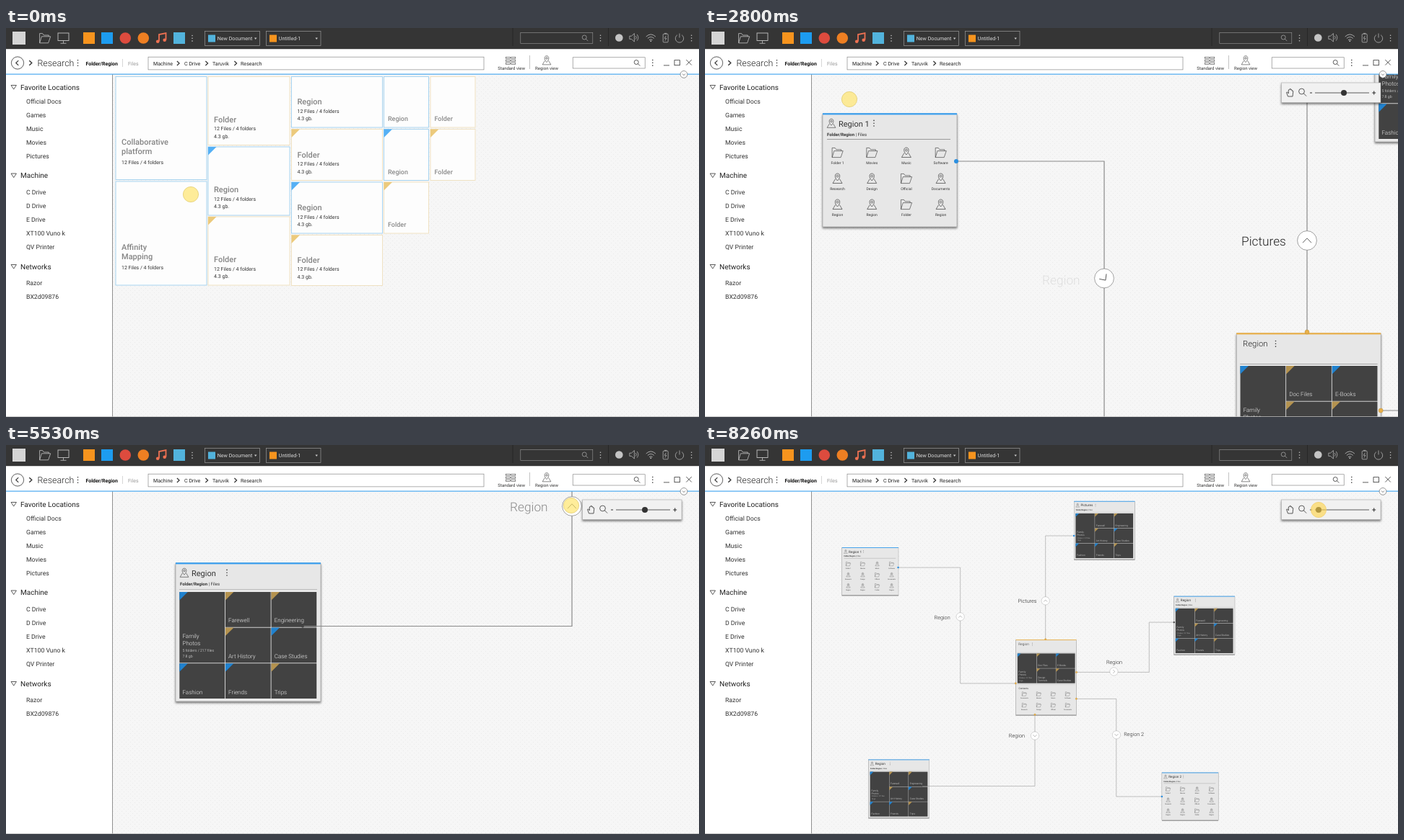
These frames come from a looping animation (960x540 px, 8.4 s). An HTML page:

```html
<!DOCTYPE html>
<html lang="en">
<head>
<meta charset="utf-8">
<title>Region file browser</title>
<style>
html, body { margin: 0; width: 100%; height: 100%; overflow: hidden; background: #fff; }
svg { display: block; width: 960px; height: 540px; font-family: Roboto, sans-serif; text-rendering: geometricPrecision; }
.shadow { filter: drop-shadow(0 2px 1.5px rgba(0, 0, 0, .5)); }
</style>
</head>
<body>
<svg id="stage" viewBox="0 0 960 540"></svg>
<script>
const BLUE = '#3a9fee', TAN = '#e9b04a', INK = '#333', PALE = '#c4c4c4';
const LOOP = 8400, STEP = 70;

// Drawing helpers
const text = (x, y, s, size, fill = INK, weight = 400, anchor = 'start') =>
  `<text x="${x}" y="${y}" font-size="${size}" fill="${fill}" font-weight="${weight}" text-anchor="${anchor}">${s}</text>`;
const rect = (x, y, w, h, fill = 'none', stroke = 'none', width = .7, more = '') =>
  `<rect x="${x}" y="${y}" width="${w}" height="${h}" fill="${fill}" stroke="${stroke}" stroke-width="${width}" ${more}/>`;
const circle = (x, y, r, fill = 'none', stroke = 'none', width = .8) =>
  `<circle cx="${x}" cy="${y}" r="${r}" fill="${fill}" stroke="${stroke}" stroke-width="${width}"/>`;
const path = (d, stroke = INK, width = .8, fill = 'none') =>
  `<path d="${d}" fill="${fill}" stroke="${stroke}" stroke-width="${width}"/>`;
const group = (x, y, body, scale = 1) =>
  `<g transform="translate(${x} ${y}) scale(${scale})">${body}</g>`;
const dots = (x, y, fill = INK, gap = 3.8) => [-gap, 0, gap].map(d => circle(x, y + d, .8, fill)).join('');
const corner = (x, y, size, fill) => path(`M${x} ${y}h${size}l${-size} ${size}z`, 'none', 0, fill);
const lens = (x, y, r, stroke, width = .8) =>
  circle(x, y, r, 'none', stroke, width) + path(`M${x + r * .7} ${y + r * .7}l${r} ${r}`, stroke, width);
const chevron = (x, y, angle = 0, size = 1, width = 1.1) =>
  `<g transform="translate(${x} ${y}) rotate(${angle}) scale(${size})">${path('M-3 1.6L0-1.6L3 1.6', INK, width / size)}</g>`;
const folder = (x, y, stroke = INK, width = .6) => group(x, y,
  path('M-7.4 6.6V-6.6h4l1.8 2.4H5.2V-2.4M-7.4 6.6L-4.6-2.4H7.7L4.6 6.6z', stroke, width));
const pin = (x, y, size = 1) => group(x, y,
  path('M0 3C-4.5-1.5-4-7 0-7S4.5-1.5 0 3z', INK, .65) + circle(0, -3.4, 1.4, 'none', INK, .65) +
  path('M-3 .6L-6.5 6.5H6.5L3 .6', INK, .65), size);

// Tiles of the standard view
function tile([x, y, w, h, kind, marked, title]) {
  const blue = kind === 'Region', bottom = y + h, lines = (title || kind).split('|');
  let out = rect(x, y, w, h, '#fdfdfd', blue ? '#9fd0ef' : '#efdfbd', .9);
  if (marked) out += corner(x, y, 11.5, blue ? '#55b0f5' : '#ecca7c');
  if (w < 100) return out + text(x + 5.5, bottom - 9, kind, 9, '#8a8a8a', 500);
  if (title) out += text(x + 8, bottom - 49, lines[0], 11, '#858585', 500) + text(x + 8, bottom - 36, lines[1], 11, '#858585', 500);
  else out += text(x + 8, bottom - 32, kind, 11, '#858585', 500) + text(x + 8, bottom - 10, '4.3 gb.', 7);
  return out + text(x + 8, bottom - (title ? 22 : 20.5), '12 Files / 4 folders', 7);
}
const tiles = [
  [152, 67.5, 126, 143, 'Region', 0, 'Collaborative|platform'],
  [152, 213, 126, 144, 'Region', 0, 'Affinity|Mapping'],
  [280, 67.5, 113, 95, 'Folder', 0], [280, 165, 113, 95, 'Region', 1], [280, 262, 113, 95, 'Folder', 1],
  [395.5, 67.5, 126, 70.5, 'Region', 0], [395.5, 140.5, 126, 71, 'Folder', 1],
  [395.5, 214, 126, 71, 'Region', 1], [395.5, 287.5, 126, 70, 'Folder', 1],
  [523.5, 67.5, 62, 70.5, 'Region', 0], [588, 67.5, 62, 70.5, 'Folder', 0],
  [523.5, 140.5, 62, 71, 'Region', 1], [588, 140.5, 62, 71, 'Folder', 1], [523.5, 214, 62, 71, 'Folder', 1]
].map(tile).join('');

// Panels of the region map
const frame = (w, h, color) =>
  rect(0, 0, w, h, '#e7e7e7', '#999', .6, 'class="shadow"') + rect(0, -.8, w, 2.2, color);
const heading = title => pin(12, 13.5, .9) + text(22, 17.5, title, 11) +
  dots(71, 13.2) + text(6, 30.5, '<tspan font-weight="700">Folder/Region</tspan> | Files', 6);
const icon = (x, y, name, isPin) => (isPin ? pin : folder)(x, y) + text(x, y + 15.7, name, 5, INK, 400, 'middle');

// Dark tiles: column, row, blue or tan corner, title
const darkGrid = (top, list) => list.map(([col, row, blue, name]) => {
  const x = 5.3 + col * 63.6, y = top + row * 49.6, tall = name === 'Family|Photos', h = tall ? 98.4 : 48.8;
  const write = (dy, s, size = 8) => text(x + 4.2, y + h - dy, s, size, '#eee', 300);
  const [a, b] = name.split('|');
  return rect(x, y, 62.8, h, '#424242') + corner(x, y, 11.5, blue ? '#2082cf' : '#b5934f') +
    (tall ? write(34.2, a) + write(24.8, b) + write(15.4, '5 folders / 217 files', 5.2) + write(7.4, '7.8 gb', 5.2)
          : b ? write(15.8, a) + write(6.2, b) : write(6.5, a));
}).join('');

const photoPanel = (x, y, title) => group(x, y, frame(201, 192, BLUE) + heading(title) +
  path('M5 36.5H196', '#aaa', .7) + rect(4.8, 39.5, 191.5, 149, '#f4f4f4') + darkGrid(40, [
    [0, 0, 1, 'Family|Photos'], [1, 0, 0, 'Farewell'], [2, 0, 0, 'Engineering'], [1, 1, 0, 'Art History'],
    [2, 1, 1, 'Case Studies'], [0, 2, 1, 'Fashion'], [1, 2, 1, 'Friends'], [2, 2, 0, 'Trips']]));

const iconPanel = (x, y, title) => group(x, y, frame(186, 157, BLUE) + heading(title) +
  path('M6 35.5H177', '#888', .8) +
  ['Folder 1', 'Movies', '*Music', 'Software', '*Research', '*Design', 'Official', '*Documents',
   '*Region', '*Region', 'Folder', '*Region'].map((s, i) =>
    icon(20.5 + i % 4 * 47.7, 54 + (i >> 2) * 36, s.replace('*', ''), s[0] === '*')).join(''));

const homePanel = group(376.2, 164, frame(200, 248, TAN) + text(8.9, 18.4, 'Region', 11.3, '#222', 300) + dots(54.3, 14.3) +
  path('M5 42.5H195.5M5 146.6H195.5', '#777', .6) + rect(4.8, 44.5, 191, 99.8, '#f4f4f4') + darkGrid(45, [
    [0, 0, 1, 'Family|Photos'], [1, 0, 0, 'Doc Files'], [2, 0, 1, 'E-Books'],
    [1, 1, 0, 'Design|Turorials'], [2, 1, 0, 'Case Studies']]) +
  text(9.3, 162.8, 'Contents', 8) +
  ['Documents', 'Movies', 'Music', 'Software', 'Research', 'Design', 'Official', 'Documents'].map((s, i) =>
    icon(28 + i % 4 * 47.7, 178.7 + (i >> 2) * 37, s)).join(''));

const wires = ['M-12-75H193V308H376', 'M568-180H474V162', 'M576 271H816V106H898',
  'M576 359H707.5V682H858', 'M439 411V647.5H66'].map(d => path(d, '#8a8a8a', 1.2)).join('');
const nodes = [[375.7, 307.8], [474, 162], [576.2, 271], [575.7, 358.7], [439, 411]]
    .map(([x, y]) => circle(x, y, 3, TAN, '#a9802f', .4)).join('') +
  [[-12, -75], [568, -180], [858, 682]].map(([x, y]) => circle(x, y, 3, '#2b8fe0')).join('') +
  circle(898, 106, 2.8, '#444') + circle(66, 648, 1.8, '#444');
const stop = (x, y, angle, label, lx, ly, id = '') => circle(x, y, 13.4, '#fff', '#666', .6) +
  `<g ${id && `id="turn${id}"`}>${chevron(x, y, angle, 2, .75)}</g>` +
  `<g ${id && `id="label${id}"`}>${text(lx, ly, label, 17.3, '#222', 300)}</g>`;
const map = photoPanel(568, -294, 'Pictures') + photoPanel(897.5, 20, 'Region') + photoPanel(-110, 560, 'Region') +
  iconPanel(-197, -141, 'Region 1') + iconPanel(858, 603, 'Region 2') + homePanel + wires + nodes +
  stop(193, 87.5, 0, 'Region', 107, 96, 1) + stop(474, 35, 0, 'Pictures', 383, 42) +
  stop(699.6, 268.8, 90, 'Region', 674.5, 243.2) + stop(708, 478, 180, 'Region 2', 732.5, 482) +
  stop(439, 481, 180, 'Region', 353, 487.5, 2);

const zoomBar = rect(798.5, 76, 137.5, 27.5, '#f1f1f1', '#aaa', .6, 'class="shadow"') +
  path('M807.5 95L805.5 89.5l1.2-.6 1.6 2V86q.9-1 1.6 0v-1.2q.9-1 1.7 0V86q.9-.8 1.6 0v1.4q1.2-.8 1.6.3L814 95z') +
  lens(826.5, 88, 3.9, INK) + path('M838 90h3M924.2 90h5M926.7 87.5v5', INK, 1.1) + path('M845 90H920') +
  `<circle id="knob" cy="90" r="4" fill="${INK}"/>`;

// Window chrome
const section = (y, title, step, names) => path(`M7 ${y - 6}h7.4l-3.7 5.6z`) + text(20, y, title, 10, '#222') +
  names.map((s, i) => text(28, y + step + i * 19.1, s, 8.7)).join('');
const sidebar = rect(0, 64, 147.5, 476, '#fff') + path('M147.5 64V540', '#777') + path('M0 539.5H960', '#bbb') +
  section(85.5, 'Favorite Locations', 19.2, ['Official Docs', 'Games', 'Music', 'Movies', 'Pictures']) +
  section(208, 'Machine', 23, ['C Drive', 'D Drive', 'E Drive', 'XT100 Vuno k', 'QV Printer']) +
  section(334.5, 'Networks', 22.5, ['Razor', 'BX2d09876']);

const toolbar = rect(0, 28, 960, 36, '#fff') + path('M0 64.1H960', '#52adf0', 1.3) +
  circle(16, 48.5, 8.6, 'none', INK) + chevron(15.5, 48.5, -90, 1.1) + chevron(34, 48.5, 90, 1.1, 1.4) +
  text(43.5, 53, 'Research', 12.4, '#222', 300) + dots(99.5, 48.5) + text(110.5, 51.5, 'Folder/Region', 7, '#111', 700) +
  path('M161.5 43V54', '#ccc') + text(169, 51.5, 'Files', 7, '#999') + rect(197, 40.2, 465, 17.7, '#fff', '#777', .6) +
  [[204, 'Machine'], [247, 'C Drive'], [286, 'Taruvik'], [325, 'Research']].map(([x, s]) => text(x, 51.7, s, 7.1, '#222')).join('') +
  [238.5, 278, 318].map(x => chevron(x, 49, 90, 1, 1.2)).join('') +
  [40.3, 44.2, 48.1].map(y => rect(692.4, y, 6, 2.4, 'none', INK, .55) + rect(699.8, y, 6, 2.4, 'none', INK, .55)).join('') +
  text(700.2, 57.8, 'Standard view', 6, INK, 400, 'middle') + path('M725.5 38V57', '#999', .6) +
  pin(749, 45, .9) + text(749, 57.8, 'Region view', 6, INK, 400, 'middle') +
  rect(785.2, 40.8, 100, 15.2, '#fff', '#777', .6) + lens(873.2, 47.5, 3, INK) + dots(895.8, 48.3) +
  path('M911 51.9H919M942.3 44l7.5 7.5M949.8 44l-7.5 7.5') + rect(926, 44.7, 7.6, 7, 'none', INK, .8) +
  circle(939, 64.4, 4.9, '#fff', '#555', .6) + chevron(939, 64.6, 180, .65, .6);

const menuButton = (x, w, color, label) => rect(x, 4.5, w, 20, 'none', '#999') +
  rect(x + 4.5, 9.5, 10, 10, color) + text(x + 17.3, 17.2, label, 7.1, '#ddd') +
  path(`M${x + w - 7.5} 13.5h3.4l-1.7 2.6z`, 'none', 0, '#ccc');
const topBar = rect(0, 0, 960, 29.2, '#353535') + path('M702 0V25M834.5 0V25', '#222', .7) +
  rect(9, 5, 18, 18, '#d5d5d5') + folder(54, 14.2, PALE, .8) +
  rect(72, 7, 15, 10.5, 'none', PALE, .9) + path('M79.5 17.5v3.5M75.5 21.3h8', PALE) +
  rect(107, 6, 16, 16, '#f7941e') + rect(132, 6, 16, 16, '#1d9cf0') +
  circle(165.3, 14, 7.8, '#dd4b3e') + circle(190.3, 14, 7.8, '#ee7f22') +
  path('M212 18.5V9l9.5-2v9.5', '#ee7152', 1.8) + circle(210.2, 18.8, 2.3, '#ee7152') + circle(219.7, 16.8, 2.3, '#ee7152') +
  rect(232, 6, 16, 16, '#52b3dc') + dots(258, 14.3, PALE) +
  menuButton(275.5, 76, '#52b3dc', 'New Document') + menuButton(360.5, 75.5, '#f7941e', 'Untitled-1') +
  rect(712.8, 6.3, 100, 15.3, 'none', '#999', .6) + lens(801.2, 13, 3, PALE, .6) + dots(823.5, 14, PALE) +
  circle(849.3, 13.5, 5.3, PALE) +
  path('M863.8 11.2h2.6l4-3.6v11.4l-4-3.6h-2.6zM872.3 11q2 2.3 0 4.6M874.2 9q3.2 4.3 0 8.6', PALE, .7) +
  path('M886.7 12q6.6-6.2 13.2 0M888.9 14.4q4.4-4 8.8 0M891 16.7q2.3-2 4.6 0', PALE) + circle(893.3, 18.2, .9, PALE) +
  rect(910.2, 8.3, 7, 11.5, 'none', PALE, .7, 'rx="1"') + path('M912 7.4h3.4M914.3 10.8l-2 3.5h2.6l-2 3.2', PALE, .7) +
  path('M930 9.6a5.7 5.7 0 1 0 6 0M933 7.5v6', PALE, .7) + dots(949.6, 14, PALE);

document.getElementById('stage').innerHTML =
  `<pattern id="grain" width="6" height="6" patternUnits="userSpaceOnUse">${circle(1.5, 1.5, .5, '#e6e6e6')}${circle(4.5, 4.5, .5, '#e6e6e6')}</pattern>
  <g id="ui">${rect(0, 0, 960, 540, '#f6f6f6') + rect(0, 0, 960, 540, 'url(#grain)')}
  <g id="tiles">${tiles}</g><g id="regions"><g id="map">${map}</g>${zoomBar}</g>
  ${sidebar + toolbar + topBar}<circle id="cursor" r="10.6" stroke-width=".8"/></g>`;

// Motion: rows of [time, ...values], eased from one to the next
const cursorKeys = [[420, 256, 231], [1260, 749, 48.7], [1610, 749, 48.7], [2170, 200, 99], [2870, 200, 99],
  [3290, 553, 348], [3850, 553, 348], [4130, 628, 400], [4480, 439, 481], [4970, 439, 481], [5390, 783, 84],
  [5880, 783, 84], [6230, 885, 90], [6300, 885, 90], [6930, 907, 90], [7490, 907, 90], [8260, 850, 90]];
const cameraKeys = [[2240, 0, 0, 1], [2660, 360, 260, 1], [3360, 360, 260, 1], [3780, 0, 0, 1], [4550, 0, 0, 1],
  [4970, 345, -396, 1], [5560, 345, -396, 1], [5950, 0, 0, 1], [6300, 0, 0, 1],
  [6930, -429.3, -229.5, 1.76], [7490, -429.3, -229.5, 1.76], [8260, 272.6, 201.6, .42]];
const zoomKeys = [[700, 1], [1300, 1.8], [1540, 1.8], [1960, 1]];
const labelKeys = [[[2520, 1], [2870, 0], [4270, 0], [4620, 1]], [[4830, 1], [5110, 0], [5460, 0], [5600, 1]]];
const turnKeys = [[[2450, 0], [2940, 180], [3360, 180], [3710, 360]], [[4690, 0], [5110, 180], [5600, 180], [5950, 360]]];
const centers = ['193 87.5', '439 481'];
const presses = [[1330, 1610], [2170, 2310], [3290, 3430], [4480, 4620], [5560, 5700], [6230, LOOP]];

function at(t, keys) {
  const i = keys.findIndex(k => k[0] > t);
  if (i < 1) return keys.at(i).slice(1);
  const [a, b] = [keys[i - 1], keys[i]], u = (t - a[0]) / (b[0] - a[0]), e = u * u * (3 - 2 * u);
  return a.slice(1).map((v, j) => v + (b[j + 1] - v) * e);
}
function set(id, attrs) {
  const node = document.getElementById(id);
  for (const name in attrs) node.setAttribute(name, attrs[name]);
}
function draw(t) {
  const [zoom] = at(t, zoomKeys), [x, y, s] = at(t, cameraKeys), [cx, cy] = at(t, cursorKeys);
  const pressed = presses.some(([from, to]) => t >= from && t < to);
  set('ui', { transform: `translate(${960 * (1 - zoom)} 0) scale(${zoom})` });
  set('tiles', { opacity: at(t, [[1330, 1], [1590, 0]])[0] });
  set('regions', { opacity: at(t, [[1680, 0], [1960, 1]])[0] });
  set('map', { transform: `translate(${x} ${y}) scale(${s})` });
  set('knob', { cx: t < 6300 ? 885 : cx });
  set('cursor', { cx, cy, fill: pressed ? 'rgba(255,212,70,.62)' : 'rgba(255,228,100,.65)', stroke: pressed ? '#f0d070' : '#e3cd72' });
  centers.forEach((center, i) => {
    set(`label${i + 1}`, { opacity: at(t, labelKeys[i])[0] });
    set(`turn${i + 1}`, { transform: `rotate(${at(t, turnKeys[i])[0]} ${center})` });
  });
}
function tick() {
  draw(Math.floor(performance.now() % LOOP / STEP) * STEP);
  requestAnimationFrame(tick);
}
tick();
</script>
</body>
</html>
```
